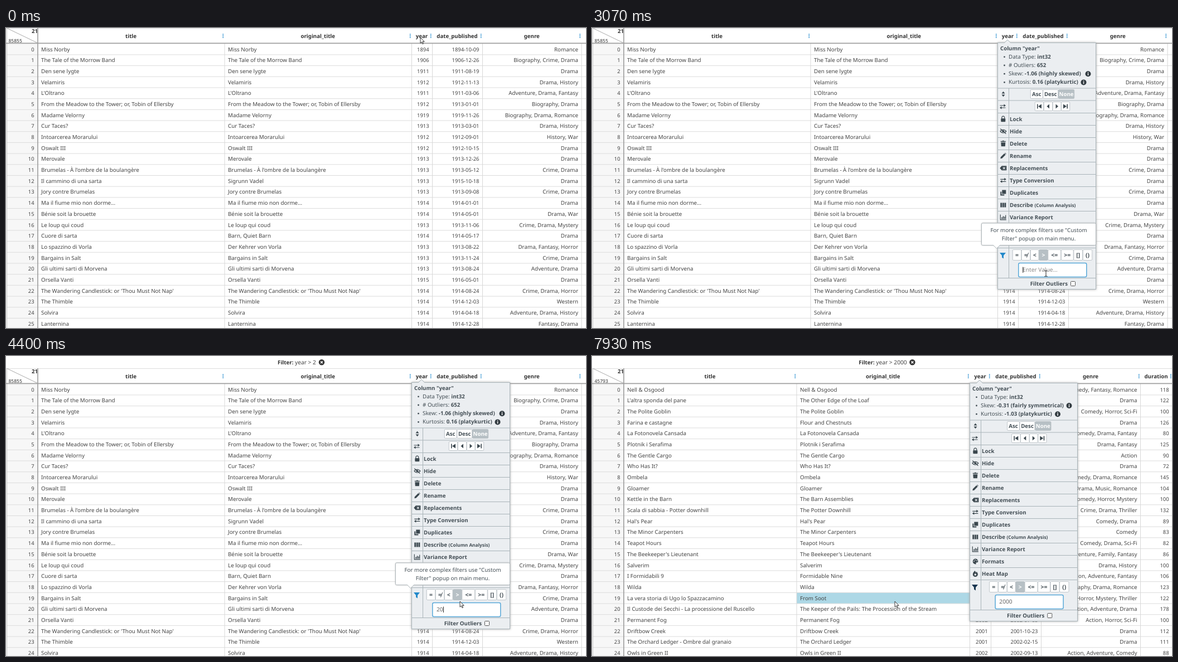
An HTML page that plays this animation: 1040 px wide and 538 px high, repeating every 8 s.

```html
<!DOCTYPE html>
<html lang="en">
<head>
<meta charset="utf-8">
<title>Data grid column filter</title>
<style>
html, body { margin: 0; width: 100%; height: 100%; overflow: hidden; background: #fff; }
svg { display: block; width: 1040px; height: 538px; }
text { font: 9.8px 'Noto Sans', sans-serif; fill: #444; text-rendering: geometricPrecision; white-space: pre; }
.num { font-size: 9.4px; }
.small { font-size: 8.5px; fill: #333; }
.head, .bold { font-weight: 700; font-size: 9.7px; fill: #333; }
.bar { font-size: 10.2px; fill: #444; }
.menu text { fill: #434e55; }
.menu tspan { fill: #434e55; }
.menu .tiny { font-size: 8.3px; }
.menu .op { font-size: 10.5px; }
.menu .field { font-size: 10.2px; fill: #666; }
.menu .hint { fill: #888; }
.menu .off { fill: #fff; }
.icon { fill: #3b474e; stroke: none; }
.line { fill: none; stroke: #3b474e; stroke-width: 1.2; }
</style>
</head>
<body>
<svg viewBox="0 0 1040 538"><g id="bar"></g><g id="table"></g><g id="menu" class="menu"></g><g id="pointer"></g></svg>
<script>
const LOOP = 8000, ROW = 19.69;

// One film per line; "=" repeats the first cell
const parse = s => s.trim().split('\n').map(line => {
  const cells = line.split('|');
  if (cells[1] === '=') cells[1] = cells[0];
  return cells;
});

const allFilms = {
  count: '85855',
  edges: [57, 392, 727.5, 764.5, 854.5, 1032],
  names: ['title', 'original_title', 'year', 'date_published', 'genre'],
  rows: parse(`
Miss Norby|=|1894|1894-10-09|Romance
The Tale of the Morrow Band|=|1906|1906-12-26|Biography, Crime, Drama
Den sene lygte|=|1911|1911-08-19|Drama
Velamiris|=|1912|1912-11-13|Drama, History
L'Oltrano|=|1911|1911-03-06|Adventure, Drama, Fantasy
From the Meadow to the Tower; or, Tobin of Ellersby|=|1912|1913-01-01|Biography, Drama
Madame Velorny|=|1919|1919-11-26|Biography, Drama, Romance
Cur Taces?|=|1913|1913-03-01|Drama, History
Intoarcerea Morarului|=|1912|1912-09-01|History, War
Oswalt III|=|1912|1912-10-15|Drama
Merovale|=|1913|1913-12-26|Drama
Brumelas - À l'ombre de la boulangère|=|1913|1913-05-12|Crime, Drama
Il cammino di una sarta|Sigrunn Vadel|1913|1915-10-18|Drama
Jory contre Brumelas|=|1913|1913-09-08|Crime, Drama
Ma il fiume mio non dorme...|=|1914|1914-01-01|Drama
Bénie soit la brouette|=|1914|1914-05-01|Drama, War
Le loup qui coud|=|1913|1913-11-06|Crime, Drama, Mystery
Cuore di sarta|Barn, Quiet Barn|1914|1914-05-17|Drama
Lo spazzino di Vorla|Der Kehrer von Vorla|1913|1913-08-22|Drama, Fantasy, Horror
Bargains in Salt|=|1913|1913-11-24|Crime, Drama
Gli ultimi sarti di Morvena|=|1913|1913-08-24|Adventure, Drama
Orsella Vanti|=|1915|1916-05-01|Drama
The Wandering Candlestick: or 'Thou Must Not Nap'|=|1914|1914-08-24|Crime, Drama, Horror
The Thimble|=|1914|1914-12-03|Western
Solvira|=|1914|1914-04-18|Adventure, Drama, History
Lanternina|=|1914|1914-12-28|Fantasy, Drama`)
};

const recentFilms = {
  count: '45793',
  edges: [57, 367, 677.5, 715.5, 805.5, 983.5, 1040.5],
  names: ['title', 'original_title', 'year', 'date_published', 'genre', 'duration'],
  rows: parse(`
Nell & Osgood|=|2001||Comedy, Fantasy, Romance|118
L'altra sponda del pane|The Other Edge of the Loaf|2018||Drama|122
The Polite Goblin|=|2005||Comedy, Horror, Sci-Fi|100
Farina e castagne|Flour and Chestnuts|2002||Drama|126
La Fotonovela Cansada|=|2017||Comedy, Drama, Fantasy|80
Plotnik i Serafima|=|2006||Drama, Fantasy|125
The Gentle Cargo|=|2001||Action|90
Who Has It?|=|2005||Drama|72
Ombela|=|2001||Comedy, Drama, Romance|145
Gloamer|=|2001||Drama, Music, Romance|104
Kettle in the Barn|The Barn Assemblies|2001||Comedy, Horror, Mystery|100
Scala di sabbia - Potter downhill|The Potter Downhill|2002||Crime, Drama, Thriller|132
Hal's Pear|=|2001||Comedy, Drama|89
The Minor Carpenters|=|2007||Comedy|83
Teapot Hours|=|2008||Comedy, Drama, Sci-Fi|82
The Beekeeper's Lieutenant|=|2001||Adventure, Family, Fantasy|86
Salverim|=|2001||Drama, History|100
I Formidabili 9|Formidable Nine|2005||Action, Adventure, Fantasy|106
Wilda|=|2002||Biography, Drama, Romance|123
La vera storia di Ugo lo Spazzacamino|From Soot|2001||Horror, Mystery, Thriller|122
Il Custode dei Secchi - La processione del Ruscello|The Keeper of the Pails: The Procession of the Stream|2001||Action, Adventure, Drama|178
Permanent Fog|=|2002|2002-07-05|Action, Horror, Sci-Fi|100
Driftbow Creek|=|2001|2001-10-23|Drama|112
The Orchard Ledger - Ombre dal granaio|The Orchard Ledger|2001|2002-02-15|Drama|111
Owls in Green II|=|2002|2002-09-13|Action, Adventure, Comedy|88`)
};

// Drawing helpers; text is placed by its vertical centre
const esc = s => String(s).replace(/&/g, '&amp;').replace(/</g, '&lt;').replace(/>/g, '&gt;');
const rawText = (x, y, s, cls = '', anchor = 'start') =>
  `<text x="${x}" y="${y + 3.5}" class="${cls}" text-anchor="${anchor}">${s}</text>`;
const text = (x, y, s, cls, anchor) => rawText(x, y, esc(s), cls, anchor);
const path = (d, attrs = 'class="icon"') => `<path d="${d}" ${attrs}/>`;
const rect = (x, y, w, h, fill, stroke = 'none', extra = '') =>
  `<rect x="${x}" y="${y}" width="${w}" height="${h}" fill="${fill}" stroke="${stroke}" ${extra}/>`;
const stroke = (d, color, width = 1) => path(d, `fill="none" stroke="${color}" stroke-width="${width}"`);
const at = (x, y, body) => `<g transform="translate(${x} ${y})">${body}</g>`;

// Timeline helpers
const held = (t, keys) => keys.filter(k => k[0] <= t).pop()[1];
const within = (t, spans) => spans.some(([a, b]) => t >= a && t < b);
function along(t, keys) {
  const i = keys.findIndex(k => k[0] > t);
  if (i < 0) return keys[keys.length - 1].slice(1);
  if (i === 0) return keys[0].slice(1);
  const [t0, x0, y0] = keys[i - 1], [t1, x1, y1] = keys[i];
  const f = (t - t0) / (t1 - t0);
  return [x0 + (x1 - x0) * f, y0 + (y1 - y0) * f];
}

const tableShift = [[0, 0], [3930, 6], [4070, 13], [4130, 17], [4200, 20], [4330, 22]];
const menuShift = [[0, 0], [4070, 4], [4130, 7], [4200, 12], [4330, 19], [4400, 21], [4530, 22]];
const typed = [[0, ''], [3870, '2'], [4400, '20'], [4530, '200'], [5270, '2000']];
const applied = [[0, ''], [3930, '2'], [4930, '200'], [5730, '2000']];
const caretOn = [[3000, 3470], [3870, 5130], [5270, 5800], [6330, 6870], [7400, 7930]];
const pointerKind = [[0, 'arrow'], [1600, 'hand'], [2730, 'arrow'], [2870, 'beam'], [4200, 'arrow'],
  [4530, 'hand'], [6330, 'arrow'], [7130, 'beam'], [7400, 'arrow']];
const pointerPath = [[1010, 743, 17], [1330, 757, 150], [1600, 785, 395], [1670, 791, 414], [1870, 801, 419],
  [2130, 809, 411], [2600, 810, 411], [2730, 812, 425], [3000, 814, 440], [7340, 814, 440],
  [7530, 650, 443], [7730, 538, 437], [7929, 538, 437], [7930, 543, 440]];

function drawBar(value) {
  if (!value) return '';
  const x = 566 + 2.8 * (value.length - 1);
  return rawText(521.5, 11, `<tspan class="bold">Filter:</tspan> year &gt; ${value}`, 'bar', 'middle') +
    `<circle cx="${x}" cy="11.3" r="5.2" fill="#333"/>` +
    stroke(`M${x - 2} 9.3l4 4m0-4l-4 4`, '#fff', 1.3);
}

function drawTable({ count, edges, names, rows }, shift, highlight) {
  const top = i => 28.2 + ROW * i;
  let out = rect(0, 0, 1040, 538, '#fff') + rect(2, 28, 54, 510, '#f7f7f7');
  if (highlight) out += rect(edges[1], top(19), edges[2] - edges[1], ROW, '#add8e6');
  for (let i = 1; i <= rows.length; i++) out += stroke(`M2 ${top(i)}H1040`, '#dcdcdc');
  out += edges.slice(1).map(x => stroke(`M${x} 28V538`, '#d8d8d8')).join('');
  out += stroke('M0 .5H1040', '#ddd') + stroke('M1.5 0V538', '#c8c8c8') +
    stroke('M2 .5L57 27', '#aaa') + stroke('M0 27.3H1040M57 0V538', '#a0a0a0', 1.7);
  out += text(57, 5.5, '21', 'small bold', 'end') + text(4.5, 22, count, 'small');
  names.forEach((name, c) => {
    const left = edges[c], right = edges[c + 1];
    out += text((left + right) / 2 - .5, 14, name, 'head', 'middle');
    for (const y of [10.5, 13.3, 16.1]) out += rect(right - 3.6, y, 1.7, 1.7, '#2a8fd0');
  });
  rows.forEach((cells, i) => {
    const y = 38 + ROW * i;
    out += text(50.5, y, i, 'num', 'end');
    cells.forEach((cell, c) => {
      if (c < 2) out += text(edges[c] + 6, y, cell);
      else out += text(edges[c + 1] - 6, y, cell, c === 4 ? '' : 'num', 'end');
    });
  });
  return at(0, shift, out);
}

// Icons are drawn around their own centre
const swap = path('M-5-2H4M5 2H-4', 'class="line"') + path('M2-4.5L5.5-2 2 .5zM-2-.5L-5.5 2-2 4.5z');
const icons = {
  sort: path('M-3-1L0-4.8 3-1zM-3 1L0 4.8 3 1z'),
  swap,
  lock: rect(-4, -1, 8, 6, '#3b474e', 'none', 'rx="1"') + path('M-2.5 0V-2.5a2.5 2.5 0 0 1 5 0V0', 'class="line"'),
  hide: path('M-5.5 0Q0-6 5.5 0Q0 6-5.5 0M-5-4.5L5 4.5', 'class="line"') + path('M-2 0a2 2 0 1 0 4 0a2 2 0 1 0-4 0'),
  trash: path('M-4.5-4.5h3l.6-1h1.8l.6 1h3V-3h-9zM-4-2h8l-.5 7h-7z'),
  pencil: path('M-5 5l.6-3L2-4.4 4.4-2-2 4.4zM2.7-5L3.6-5.5 5.5-3.6 5-2.7z'),
  erase: path('M-6 0L-2.5-4H6V4H-2.5z') + stroke('M-.5-2l4 4m0-4l-4 4', '#ebeef1', 1.2),
  copy: path('M-2-5H5V2H-2zM-5-2h2v5h5v2h-7z'),
  columns: path('M-5-4h2.8v8H-5zM-1.4-4h2.8v8h-2.8zM2.2-4H5v8H2.2z'),
  chart: path('M-5-5V4.5H5.5', 'class="line"') + path('M-3 0h1.6v3H-3zM-.6-2H1v5H-.6zM1.8-1h1.4v4H1.8zM3.8-4H5v7H3.8z'),
  palette: path('M0-5a5 5 0 1 0 1 10q1-1 0-2 0-1.5 2-1.3 2.2 0 2-2A5 5 0 0 0 0-5') +
    rect(-3, -1, 1.5, 1.5, '#ebeef1') + rect(-1, -3.5, 1.5, 1.5, '#ebeef1') + rect(2, -2, 1.5, 1.5, '#ebeef1'),
  flame: path('M-1-5.5Q1-4 1-2Q2-2 2-4Q5-1 4.5 1.5A4.5 4 0 0 1-4.5 1.5Q-4.5-2-1-5.5') +
    '<circle cy="1.5" r="1.8" fill="#ebeef1"/>'
};
const funnel = color => path('M-5.5-5h11L1.5 0V5.5L-1.5 3.5V0z', `fill="${color}"`);

const items = [['lock', 'Lock'], ['hide', 'Hide'], ['trash', 'Delete'], ['pencil', 'Rename'],
  ['erase', 'Replacements'], ['swap', 'Type Conversion'], ['copy', 'Duplicates'], ['columns', 'Describe'],
  ['chart', 'Variance Report'], ['palette', 'Formats'], ['flame', 'Heat Map']];
const operators = ['=', '≠', '<', '>', '<=', '>=', '[]', '()'];
const operatorEdges = [27, 43, 59, 74.3, 90.5, 114, 136.5, 153, 170];

function buttonRow(labels, edges, y, height, active, cls) {
  return labels.map((label, i) => {
    const on = i === active, x = edges[i], w = edges[i + 1] - x;
    return rect(x + .3, y - height / 2, w - .6, height, on ? '#b7c0c5' : '#fff', '#b4bcc1', 'rx="1.5" stroke-width=".8"') +
      text(x + w / 2, y, label, on ? cls + ' off' : cls, 'middle');
  }).join('');
}

function infoIcon(x, y) {
  return `<circle cx="${x}" cy="${y}" r="5" fill="#333c42"/>` +
    rect(x - .7, y - .8, 1.5, 3.6, '#fff') + rect(x - .7, y - 3, 1.5, 1.4, '#fff');
}

function drawStats(updated) {
  const stats = [['Data Type', 'int32'], ['# Outliers', '652'],
    ['Skew', '-1.06 (highly skewed)', 162.5], ['Kurtosis', '0.16 (platykurtic)', 154.5]];
  if (updated) stats.splice(1, 3, ['Skew', '-0.31 (fairly symmetrical)', 178.5], ['Kurtosis', '-1.03 (platykurtic)', 158]);
  return text(5, 10, 'Column "year"', 'bold') + stats.map(([label, value, info], i) => {
    const y = 25.3 + 15.2 * i;
    return `<circle cx="12.5" cy="${y + .5}" r="1.4" fill="#434e55"/>` +
      rawText(20, y, `${label}: <tspan class="bold">${value}</tspan>`) + (info ? infoIcon(info, y + .5) : '');
  }).join('');
}

function drawField({ greater, focused, value, caret }) {
  const edge = focused ? '#58a8d8' : '#b4bcc1', box = 'rx="2.5" stroke-width="1.5"';
  if (!greater) {
    return rect(27.5, 395.3, 111, 23.5, '#fff', '#58a8d8', box) + text(35, 406.5, 'Select...', 'field hint') +
      path('M126 404.5h8.4l-4.2 4.4z');
  }
  return rect(37.8, 395.5, 122, 25, '#fff', edge, box) +
    text(45, 407.8, value || 'Enter Value...', value ? 'field' : 'field hint') +
    (caret ? rect(45.3 + 5.83 * value.length, 402.5, 1, 10.5, '#222') : '');
}

function drawTooltip(width) {
  const x = width - 204.5;
  return rect(x, 324, 205, 39.5, '#fff', '#b0b8bc', 'rx="2" filter="drop-shadow(0 0 1px #bbb)"') +
    path(`M${x + 21} 363h12l-6 6z`, 'fill="#fff"') + stroke(`M${x + 21} 363.5l6 6 6-6`, '#b0b8bc') +
    text(x + 102.5, 336, 'For more complex filters use "Custom', '', 'middle') +
    text(x + 102.5, 351, 'Filter" popup on main menu.', '', 'middle');
}

function drawMenu(s) {
  const width = s.updated ? 193 : 176, lift = s.updated ? -15 : 0, grow = s.greater ? 2 : 0;
  const border = '#a9b4b9';
  const separators = [82, 104, ...items.map((_, i) => 126.5 + 22 * i), 368.5, 420.5 + grow];

  const move = [67, 83, 99, 114.3, 130];
  const controls = buttonRow(['Asc', 'Desc', 'None'], [59, 81.5, 109, 138], 92.5, 16, 2, 'bold') +
    buttonRow(['', '', '', ''], move, 114.5, 16) +
    at(75, 114.5, path('M-4-4h1.6v8H-4zM4-4v8L-2 0z')) + at(91, 114.5, path('M2-4v8L-2.5 0z')) +
    at(106.5, 114.5, path('M-2-4v8L2.5 0z')) + at(122, 114.5, path('M2.4-4H4v8H2.4zM-4-4v8L2 0z')) +
    buttonRow(operators, operatorEdges, 381, 19, s.greater ? 3 : 0, 'bold op') + drawField(s) +
    text(58.8, 430 + grow, 'Filter Outliers', 'bold') +
    rect(131.5, 426.5 + grow, 8, 8, '#fff', '#555', 'rx="1"');

  const body = separators.map(y => stroke(`M0 ${y}H${width}`, border)).join('') +
    stroke(`M20.5 82V${420.5 + grow}`, border) +
    at(10.5, 92.5, icons.sort) + at(9.5, 115, icons.swap) +
    items.map(([icon, label], i) => {
      const y = 137.2 + 22.03 * i;
      const note = label === 'Describe' ? ' <tspan class="tiny">(Column Analysis)</tspan>' : '';
      return at(10.3, y, icons[icon]) + rawText(22, y, label + note, 'bold');
    }).join('') +
    at(9.5, 382, funnel(s.hover ? '#2389ca' : '#17344f')) +
    at(s.updated ? 8.3 : 0, 0, controls) +
    (s.tooltip ? drawTooltip(width) : '');

  return at(s.x, s.y, rect(.5, .5, width, 440 + lift + grow, '#ebeef1', border, 'filter="drop-shadow(0 0 2px #aaa)"') +
    path('M12.5 1L18-4.5 23.5 1z', 'fill="#ebeef1"') + stroke('M12.5 .5L18-5 23.5 .5', border) +
    drawStats(s.updated) + at(0, lift, body));
}

const outlined = 'fill="#fff" stroke="#222" stroke-width=".9" stroke-linejoin="round"';
const pointers = {
  arrow: path('M0 0V10.2L2.4 8 4 11.8 5.6 11 4 7.4H7.2z', outlined),
  hand: path('M-1.2 1Q0-.5 1 1V5L5.5 6Q6.8 6.5 6.5 8L5.5 12H-.5L-3.8 7.5Q-3.5 5.5-1.2 7z', outlined),
  beam: stroke('M-2.5-5Q0-5 0-4Q0-5 2.5-5M0-4V5M-2.5 5.5Q0 5.5 0 4.5Q0 5.5 2.5 5.5', '#222')
};

const painted = {};
function paint(id, markup) {
  if (painted[id] === markup) return;
  document.getElementById(id).innerHTML = painted[id] = markup;
}

function render(t) {
  const [x, y] = along(t, pointerPath);
  paint('bar', drawBar(held(t, applied)));
  paint('table', drawTable(t < 6200 ? allFilms : recentFilms, held(t, tableShift), t > 7400 && x < 677));
  paint('menu', t < 800 ? '' : drawMenu({
    x: t < 6330 ? 727 : 677,
    y: 26 + held(t, menuShift),
    updated: t >= 7130,
    greater: t >= 2270,
    focused: t >= 3000,
    value: held(t, typed),
    caret: within(t, caretOn),
    hover: t >= 1600 && t < 7400,
    tooltip: t >= 1600 && t < 7400
  }));
  paint('pointer', at(x, y, pointers[held(t, pointerKind)]));
}

function tick() {
  render(performance.now() % LOOP);
  requestAnimationFrame(tick);
}
tick();
</script>
</body>
</html>
```
